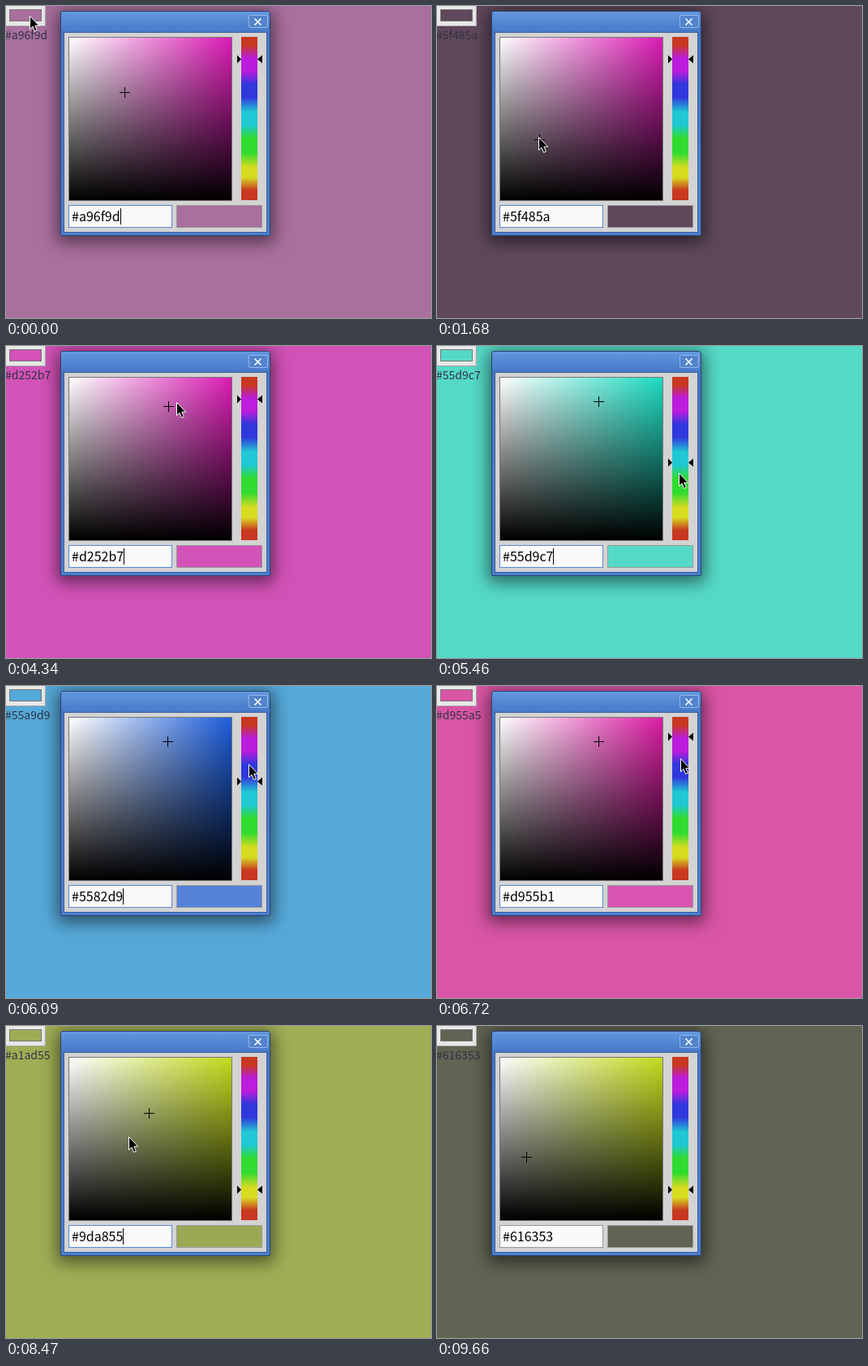
Animation of 524x384 px, one loop 9730 ms. Source, as an HTML page:

```html
<!DOCTYPE html>
<html lang="en">
<head>
<meta charset="utf-8">
<title>Colour picker</title>
<style>
  html, body { margin: 0; width: 100%; height: 100%; overflow: hidden; }
  #stage { position: relative; width: 524px; height: 384px; overflow: hidden; background: var(--page);
    font-family: "Noto Sans CJK JP", "Noto Sans CJK SC", "Noto Sans", sans-serif; }
  #stage * { box-sizing: border-box; }
  #stage div, svg { position: absolute; }
  #button { left: -1px; top: -1px; width: 50px; height: 26px; background: #e8e8e8; border: 1px solid #aaa; }
  #button div { left: 4px; top: 4px; width: 40px; height: 15px; background: var(--page); border: 1px solid #777; }
  #label { left: -1px; top: 25px; font-size: 14px; line-height: 20px; color: #303344; }
  #dialog { left: 67px; top: 6px; width: 259px; height: 277px; border: 1px solid #2c4472; border-radius: 3px 3px 1px 1px;
    background: linear-gradient(#6398df, #4577c6 26px, #4b7fd0); box-shadow: 0 4px 20px 4px rgba(0, 0, 0, .52); }
  #panel { left: 71px; top: 32px; width: 251px; height: 247px; background: #d3d3d3; border: 1px solid #3a5f9c; }
  #close { left: 299px; top: 11px; width: 24px; height: 16px; border: 1px solid #91b6e9; border-radius: 2px; background: #5484cc; }
  #square { left: 77px; top: 38px; width: 202px; height: 202px; border: 1px solid #777;
    background: linear-gradient(to top, #000, transparent), linear-gradient(to right, #fff, transparent), var(--pure); }
  #bar { left: 290px; top: 38px; width: 20px; height: 201px;
    background: linear-gradient(#c83820 5%, #bc1cdc 13% 21%, #3038dc 29% 37%, #20c8d4 46% 54%, #30dc30 62% 71%, #d8dc20 80% 86%, #c83820 94%); }
  #field { left: 77px; top: 245px; width: 128px; height: 28px; padding-left: 3px; border: 1px solid #5b88cf; background: #fafafa;
    font-size: 16px; line-height: 24px; color: #000; white-space: nowrap; }
  #caret { display: inline-block; width: 1px; height: 20px; background: #000; vertical-align: top; margin-top: 3px; }
  #preview { left: 210px; top: 245px; width: 106px; height: 28px; border: 1px solid #999; background: var(--picked); }
  svg { left: 0; top: 0; }
</style>
</head>
<body>
<div id="stage">
  <div id="button"><div></div></div>
  <div id="label"></div>
  <div id="dialog"></div>
  <div id="panel"></div>
  <div id="close"></div>
  <div id="square"></div>
  <div id="bar"></div>
  <div id="field"><span id="hex"></span><span id="caret"></span></div>
  <div id="preview"></div>
  <svg width="524" height="384">
    <path d="M306.500 15.500l8 8m0-8l-8 8" stroke="#fff" stroke-width="1.600"/>
    <path id="cross" d="M-6 .5H7M.5-6V7" stroke="#000"/>
    <path id="marks" d="M285-4.500l5 5l-5 5zM316-4.500l-6 5l6 5z"/>
    <path id="arrow" d="M.5.500V16.500L4 13.200L6.600 19.300L9.400 18.100L6.800 12.200H11.700Z" fill="#000" stroke="#fff"/>
  </svg>
</div>
<script>
const LOOP = 9730, STEP = 70, LAG = 140;
const LEFT = 78, TOP = 39, SIZE = 200;
const FIRST = { x: 146.640, y: 106.450, hue: 312.360 };

// Pointer stops: time, x, y
const stops = [
  [140, 30, 12], [490, 243, 110], [630, 243, 110],
  [1600, 125, 165], [2200, 150, 85], [2800, 239.400, 83.360], [3410, 141, 71.400], [3970, 203.700, 136.300], [4250, 199.660, 68.800],
  [4690, 309, 78], [4830, 309, 78], [5500, 299, 157.700], [6520, 301, 59.200], [7197, 301, 201.260],
  [7560, 219.700, 187.230], [8265, 180.300, 103.200], [8700, 120, 175], [9240, 110.320, 161.350], [9430, -30, 150]
];

const $ = id => document.getElementById(id);
const clamp = (v, lo, hi) => Math.min(hi, Math.max(lo, v));

// Eased travel from stop to stop
function pointer(t) {
  const i = stops.findIndex(s => s[0] > t);
  const [t1, x1, y1] = stops.at(i);
  const [t0, x0, y0] = i < 0 ? stops.at(-1) : stops[Math.max(0, i - 1)];
  const u = t1 > t0 ? (t - t0) / (t1 - t0) : 0;
  const ease = u * u * (3 - 2 * u);
  return [x0 + (x1 - x0) * ease, y0 + (y1 - y0) * ease];
}

// Selection after the drags in the square, the bar and the square again
function pick(t) {
  let { x, y, hue } = FIRST;
  if (t >= 560) [x, y] = pointer(t < 7420 ? Math.min(t, 4250) : Math.min(t, 9240));
  if (t >= 4690) hue = 360 * (1 - (pointer(Math.min(t, 7197))[1] - TOP) / SIZE);
  return { x: clamp(x, LEFT, LEFT + SIZE), y: clamp(y, TOP, TOP + SIZE), hue };
}

function rgb(hue, s, v) {
  return [5, 3, 1].map(n => {
    const k = (n + hue / 60) % 6;
    return Math.round(255 * v * (1 - s * clamp(Math.min(k, 4 - k), 0, 1)));
  });
}

function hex(p) {
  const c = rgb(p.hue, (p.x - LEFT) / SIZE, 1 - (p.y - TOP) / SIZE);
  return '#' + c.map(v => v.toString(16).padStart(2, '0')).join('');
}

function place(id, x, y) {
  $(id).setAttribute('transform', `translate(${Math.floor(x)} ${Math.floor(y)})`);
}

function draw(now) {
  const t = Math.floor((now % LOOP) / STEP) * STEP;
  const p = pick(t - LAG), picked = hex(p);
  // The page falls one step further behind late in the loop
  const page = hex(pick(t - LAG - (t > 6000 ? STEP : 0)));
  const [x, y] = pointer(t);
  const style = $('stage').style;
  style.setProperty('--page', page);
  style.setProperty('--picked', picked);
  style.setProperty('--pure', `rgb(${rgb(p.hue, 1, 1).map(v => 28 + v * 0.75)})`);
  $('label').textContent = page;
  $('hex').textContent = picked;
  $('caret').style.visibility = t % 1000 < 480 && t < 9450 ? 'visible' : 'hidden';
  $('field').style.borderColor = t >= 9660 ? '#999' : '#5b88cf';
  place('cross', p.x, p.y);
  place('marks', 0, TOP + SIZE * (1 - p.hue / 360));
  place('arrow', x - 1, y);
}

function tick() {
  draw(performance.now() - start);
  requestAnimationFrame(tick);
}

const start = performance.now();
tick();
</script>
</body>
</html>
```
